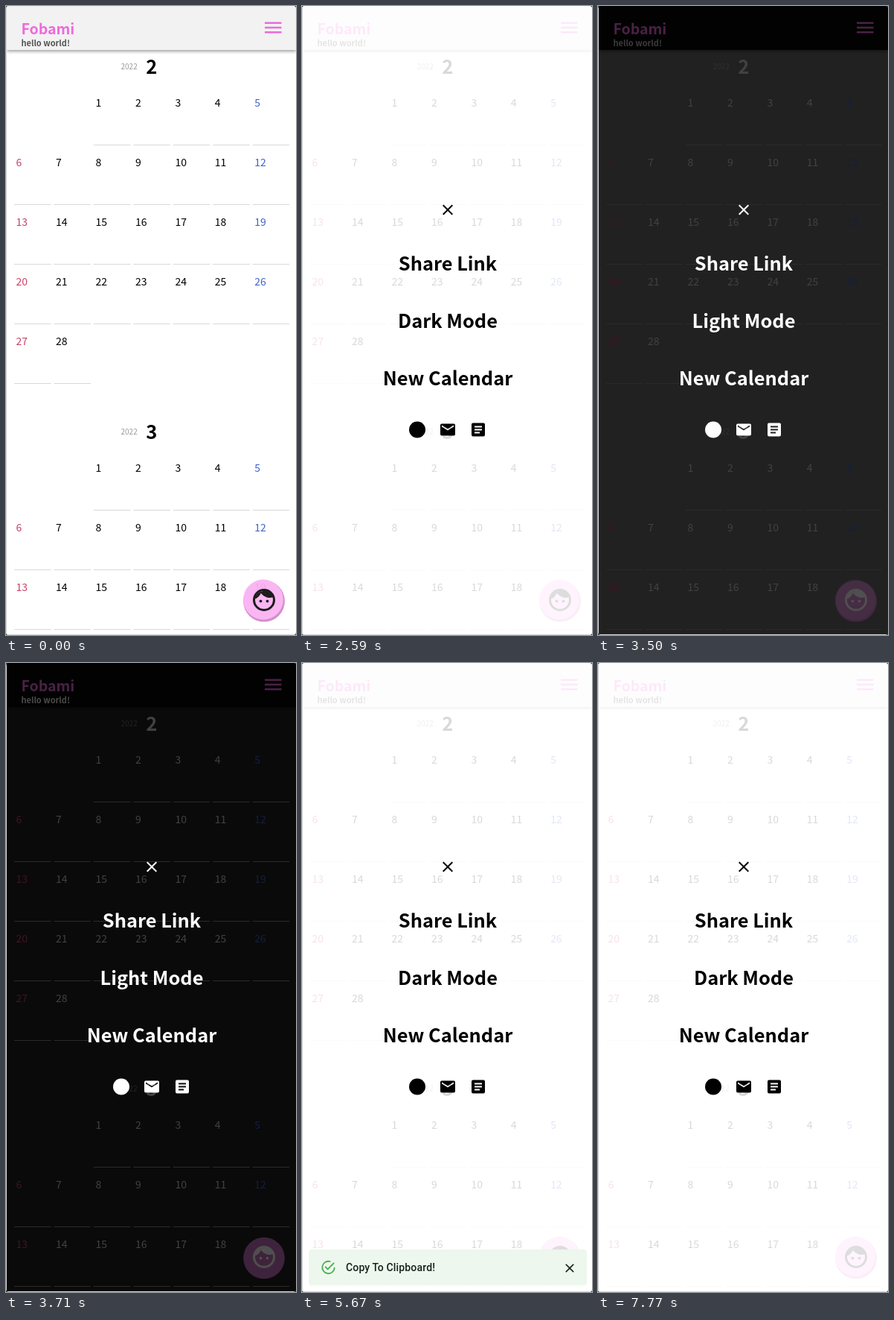
These frames come from a looping animation (390 px wide and 844 px high, 8 s). An HTML page:

```html
<!DOCTYPE html>
<html lang="en">
<head>
<meta charset="utf-8">
<title>Calendar menu</title>
<style>
  html, body { margin: 0; width: 100%; height: 100%; overflow: hidden; background: #444; }
  svg { display: block; width: 390px; height: 844px; border-radius: 4px; }
  text { font-family: "Noto Sans CJK KR", "Noto Sans CJK JP", "Noto Sans CJK SC", "Noto Sans CJK", "Noto Sans", sans-serif; }
  #days text { font-size: 14px; font-weight: 500; }
  #days .year { font-size: 10px; font-weight: 400; opacity: .4; }
  #days .month { font-size: 25.6px; font-weight: 700; text-anchor: middle; }
  .sun { fill: #c94068; }
  .sat { fill: #3f62cc; }
  #bar { filter: drop-shadow(0 2px 2px rgba(0, 0, 0, .38)); }
  #title { font-size: 19.5px; font-weight: 700; }
  #greeting { font-size: 11px; font-weight: 700; }
  #items text { font-size: 25.4px; font-weight: 700; text-anchor: middle; }
  #toast { transform-box: fill-box; transform-origin: center; }
  #toast text { font: 500 14px Roboto, sans-serif; letter-spacing: .01071em; }
</style>
</head>
<body>
<svg viewBox="0 0 390 844">
  <defs>
    <path id="cross" d="M19 6.41L17.59 5 12 10.59 6.41 5 5 6.41 10.59 12 5 17.59 6.41 19 12 13.41 17.59 19 19 17.59 13.41 12z"/>
  </defs>

  <rect id="page" width="390" height="844"/>
  <g id="lines"></g>
  <g id="days"></g>

  <rect id="bar" x="1" y="-6" width="389" height="65"/>
  <g fill="#ee6adc">
    <text id="title" x="20.5" y="38">Fobami</text>
    <path d="M348 21.5h22.5v2.5H348zm0 6.25h22.5v2.5H348zm0 6.25h22.5v2.5H348z"/>
  </g>
  <text id="greeting" x="20.5" y="54">hello world!</text>

  <g opacity=".92">
    <circle id="button" cx="347" cy="798.5" r="27.8"/>
    <g id="rim">
      <circle cx="347" cy="798.5" r="27.8" fill="#cf85c8"/>
      <circle cx="346" cy="796.5" r="26.9" fill="#fab0f1"/>
    </g>
  </g>
  <g id="face" transform="translate(329 779) scale(1.5)">
    <circle cx="12" cy="12" r="9" fill="none" stroke="currentColor" stroke-width="2"/>
    <path fill="currentColor" d="M3.5 11.3C6.4 10.1 8.3 8.2 9.26 5.77 11.07 8.33 14.05 10 17.42 10c.78 0 1.53-.09 2.25-.26L20.5 9A9 9 0 0 0 3.5 11.3z"/>
    <circle cx="9" cy="13" r="1.25" fill="currentColor"/>
    <circle cx="15" cy="13" r="1.25" fill="currentColor"/>
  </g>

  <g id="menu">
    <rect id="veil" width="390" height="844"/>
    <g id="items">
      <use href="#cross" transform="translate(184 261.5)"/>
      <text x="196" y="355">Share Link</text>
      <text id="toDark" x="196" y="432">Dark Mode</text>
      <text id="toLight" x="196" y="432">Light Mode</text>
      <text x="196" y="509">New Calendar</text>
      <circle cx="155" cy="568.5" r="11"/>
      <path transform="translate(184 556.5)" d="M20 4H4a2 2 0 0 0-2 2v12a2 2 0 0 0 2 2h16a2 2 0 0 0 2-2V6a2 2 0 0 0-2-2zm0 4l-8 5-8-5V6l8 5 8-5z"/>
      <path transform="translate(225 556.5)" d="M19 3H5a2 2 0 0 0-2 2v14a2 2 0 0 0 2 2h14a2 2 0 0 0 2-2V5a2 2 0 0 0-2-2zm-5 14H7v-2h7zm3-4H7v-2h10zm0-4H7V7h10z"/>
    </g>
  </g>

  <g id="toast">
    <rect x="9" y="787" width="374" height="48" rx="4" fill="#edf7ed"/>
    <g transform="translate(24.5 800) scale(.917)" fill="none" stroke="#4caf50" stroke-width="2">
      <path d="M21 12A9 9 0 1 1 15 3.5M7.2 10.8L11 14.6 20.3 5.3"/>
    </g>
    <text x="59" y="816" fill="#14231a">Copy To Clipboard!</text>
    <use href="#cross" transform="translate(350 802) scale(.833)" fill="#14231a"/>
  </g>

  <path d="M.5 0V843.5H390" fill="none" stroke="#d6d6d6"/>
</svg>
<script>
const LOOP = 8000;
const $ = id => document.getElementById(id);

function add(parent, tag, attrs, text = '') {
  const el = document.createElementNS('http://www.w3.org/2000/svg', tag);
  for (const name in attrs) el.setAttribute(name, attrs[name]);
  el.textContent = text;
  parent.append(el);
}

function drawMonth(top, month, firstColumn, dayCount) {
  add($('days'), 'text', { class: 'year', x: 154.5, y: top + 84.5 }, '2022');
  add($('days'), 'text', { class: 'month', x: 195.7, y: top + 91 }, month);
  for (let day = 1; day <= dayCount; day++) {
    const cell = day - 1 + firstColumn;
    const column = cell % 7;
    const x = 11 + column * 53.45;
    const y = top + Math.floor(cell / 7) * 80;
    const kind = column === 0 ? 'sun' : column === 6 ? 'sat' : 'weekday';
    add($('days'), 'text', { class: kind, x: x + 2.6, y: y + 135.3 }, day);
    add($('lines'), 'rect', { x, y: y + 186, width: 49.5, height: 1 });
  }
}

// Steps are [ms, value, easing towards the next step].
function play(id, prop, steps) {
  const frames = steps.map(([ms, value, easing = 'linear']) =>
    ({ offset: ms / LOOP, [prop]: value, easing }));
  frames.push({ offset: 1, [prop]: steps[steps.length - 1][1] });
  $(id).animate(frames, { duration: LOOP, iterations: Infinity }).startTime = start;
}

const DARK = 3200, LIGHT = 4255, FADE = 500;
const hard = (light, dark) =>
  [[0, light, 'step-end'], [DARK, dark, 'step-end'], [LIGHT, light]];
const soft = (light, dark) => [
  [0, light], [DARK, light, 'ease-in-out'], [DARK + FADE, dark],
  [LIGHT, dark, 'ease-in-out'], [LIGHT + FADE, light]];
const popup = (hidden, shown) => [
  [0, hidden], [5480, hidden, 'ease-out'], [5660, shown],
  [7580, shown, 'ease-in-out'], [7765, hidden]];

drawMonth(0, 2, 2, 28);
drawMonth(490, 3, 2, 31);

const start = document.timeline.currentTime ?? performance.now();

play('page', 'fill', soft('#ffffff', '#222222'));
play('days', 'fill', hard('#000000', '#d0d0d0'));
play('lines', 'fill', hard('#d9d9d9', '#8a8a8a'));
play('bar', 'fill', hard('#f2f2f2', '#080808'));
play('greeting', 'fill', soft('#555555', '#eeeeee'));
play('button', 'fill', soft('#fab0f1', '#d878d0'));
play('rim', 'opacity', soft(1, 0));
play('face', 'color', hard('#1c1c1c', '#ffffff'));

play('veil', 'fill', hard('rgba(255,255,255,.85)', 'rgba(0,0,0,.69)'));
play('items', 'fill', hard('#000000', '#ffffff'));
play('toDark', 'opacity', hard(1, 0));
play('toLight', 'opacity', hard(0, 1));
play('menu', 'opacity', [[0, 0], [1650, 0, 'ease'], [1650 + FADE, 1]]);

play('toast', 'opacity', popup(0, 1));
play('toast', 'transform', popup('scale(.75, .5625)', 'scale(1, 1)'));
</script>
</body>
</html>
```
